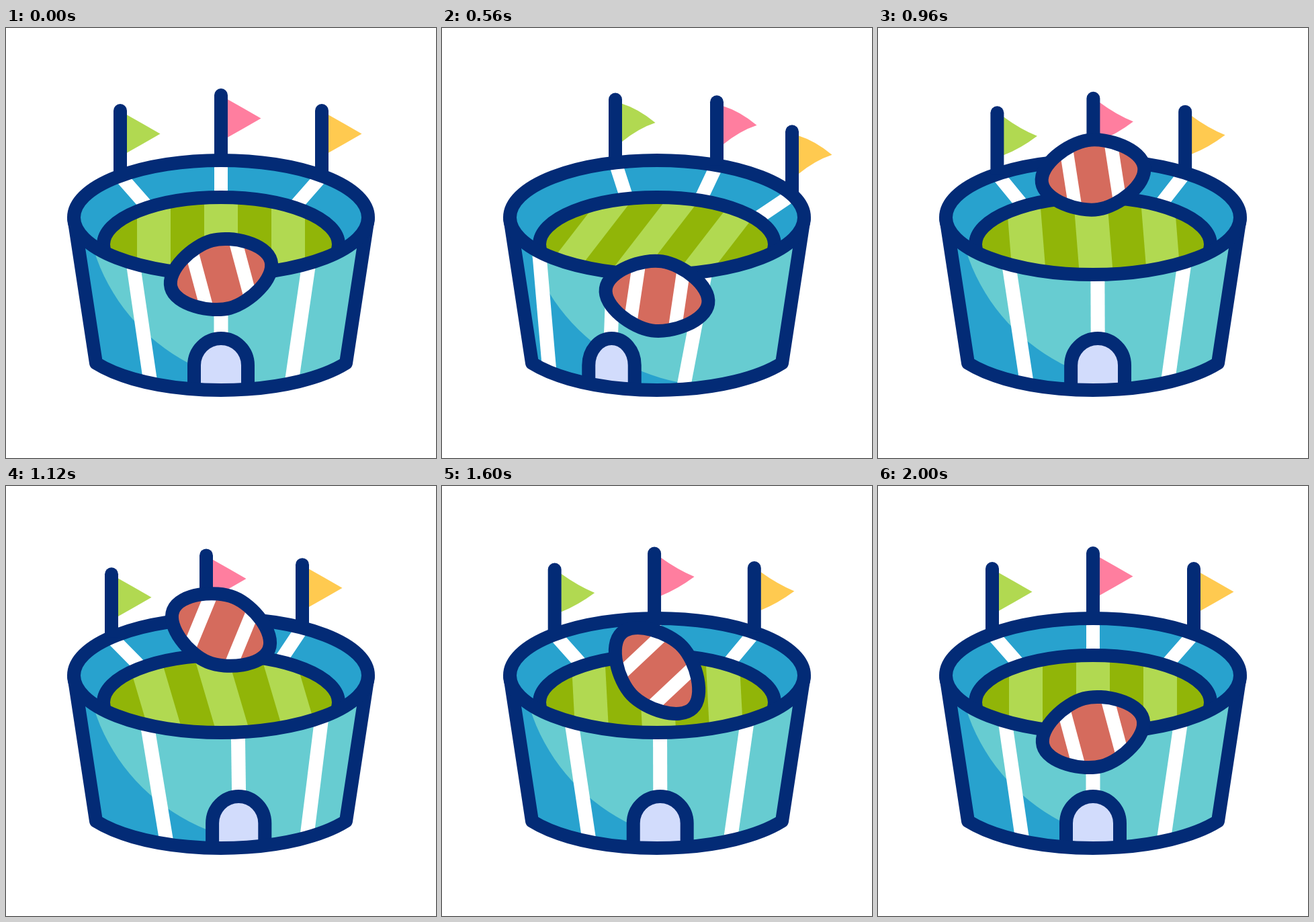
An HTML page with a canvas for the animation above (2.32 s loop, 640 px wide and 640 px high).

```html
<!DOCTYPE html>
<html lang="en">
<head>
<meta charset="utf-8">
<title>Stadium</title>
<style>
html, body { margin: 0; width: 100%; height: 100%; overflow: hidden; background: #fff; }
canvas { display: block; width: 640px; height: 640px; }
</style>
</head>
<body>
<canvas id="stage"></canvas>
<script>
const LOOP = 2320, STEP = 40, LAST = 50;
const NAVY = '#032b76', BLUE = '#28a2ce', TEAL = '#67ccd1', WHITE = '#fff';
const GRASS = '#91b508', LIGHT = '#b1d951', DOOR = '#d2dcfc', LEATHER = '#d56b5d';

const canvas = document.getElementById('stage');
const ratio = window.devicePixelRatio || 1;
canvas.width = canvas.height = 640 * ratio;
const ctx = canvas.getContext('2d');

const MID = 320;
const RIM = { x: MID, y: 282, rx: 219, ry: 85 };
const BASE = { ...RIM, y: 454 };
const FIELD = { x: MID, y: 322, rx: 175, ry: 70 };
const SHADE = { x: 410, y: 247, rx: 292, ry: 286 };

// Pole places at rest, turned right and turned left
const POLES = [
  { x: [170, 258, 157], color: LIGHT },
  { x: [320, 409, 298], color: '#ff7e9f' },
  { x: [470, 521, 441], color: '#ffca50' }
];
const TURN = [0, -18.3, 7];

// Keys: step, value, then bias and power of the ease that leads there
const BALL_Y = [[0, 366.5], [10, 419], [28, 214, 0.72, 2.4], [50, 366.5, 1.47, 2]];
const BALL_TURN = [[0, -15], [9, -41, 1, 2], [34, 218, 0.6, 1.65], [50, 345, 1.7, 2.5]];
const WAVE = [[0, 0], [11, -11], [20, 9], [28, 0], [40, 4], [50, 0]];

// S-shaped ease; a bias under 1 speeds up the first half
function ease(s, bias = 1, power = 1.7) {
  if (s <= 0) return 0;
  return 1 / (1 + (bias * (1 - s) / s) ** power);
}

function tween(keys, n) {
  const i = Math.max(1, keys.findIndex(key => key[0] >= n));
  const [t0, v0] = keys[i - 1], [t1, v1, bias, power] = keys[i];
  return v0 + (v1 - v0) * ease((n - t0) / (t1 - t0), bias, power);
}

// Shares of the three poses: rest, turned right, turned left
function poseWeights(n) {
  if (n <= 14) {
    const p = Math.sin(n / 14 * Math.PI / 2);
    return [1 - p, p, 0];
  }
  if (n <= 28) {
    const p = ease((n - 14) / 14, 1, 1.5);
    return [0, 1 - p, p];
  }
  const p = ease((n - 28) / 22, 0.56, 2);
  return [p, 0, 1 - p];
}

function ellipse(e) {
  ctx.beginPath();
  ctx.ellipse(e.x, e.y, e.rx, e.ry, 0, 0, 2 * Math.PI);
}

function fill(color) {
  ctx.fillStyle = color;
  ctx.fill();
}

function stroke(color = NAVY) {
  ctx.strokeStyle = color;
  ctx.lineWidth = 20;
  ctx.stroke();
}

// Upright or slanted band between two heights
function band(x0, y0, x1, y1, width, color) {
  ctx.beginPath();
  ctx.moveTo(x0, y0);
  ctx.lineTo(x0 + width, y0);
  ctx.lineTo(x1 + width, y1);
  ctx.lineTo(x1, y1);
  fill(color);
}

// Height of an ellipse at x: side -1 is the far half, 1 the near half
function edgeY(e, x, side) {
  const u = (x - e.x) / e.rx;
  return e.y + side * e.ry * Math.sqrt(Math.max(0, 1 - u * u));
}

function clipped(draw) {
  ctx.save();
  ctx.clip();
  draw();
  ctx.restore();
}

function wallPath() {
  const a = Math.acos(186 / BASE.rx);
  ctx.beginPath();
  ctx.moveTo(MID - RIM.rx, RIM.y);
  ctx.ellipse(MID, BASE.y, BASE.rx, BASE.ry, 0, Math.PI - a, a, true);
  ctx.lineTo(MID + RIM.rx, RIM.y);
}

function drawDoor(turn) {
  const x = MID + 215 * Math.sin(turn), half = 40 * Math.cos(turn) ** 3, y = 502;
  ctx.beginPath();
  ctx.moveTo(x - half, edgeY(BASE, x - half, 1));
  ctx.lineTo(x - half, y);
  ctx.ellipse(x, y, half, 40, 0, Math.PI, 2 * Math.PI);
  ctx.lineTo(x + half, edgeY(BASE, x + half, 1));
  fill(DOOR);
  stroke();
}

function drawWall(turn) {
  wallPath();
  fill(BLUE);
  clipped(() => {
    ellipse(SHADE);
    fill(TEAL);
    const R = 205, skew = 0.33 * R * Math.sin(turn);
    for (let side = -1; side <= 1; side++) {
      const top = R * Math.sin(side * 0.702 + turn), low = 0.78 * top + skew;
      band(MID + top - 10.5, 340, MID + low - 10.5, 540, 21, WHITE);
    }
  });
  drawDoor(turn);
  wallPath();
  stroke();
}

function drawBackStripe(x) {
  const low = MID + 0.77 * (x - MID);
  ctx.beginPath();
  ctx.moveTo(x, edgeY(RIM, x, -1));
  ctx.lineTo(low, edgeY(FIELD, low, -1) - 10);
  ctx.lineTo(low + (low - x) * 0.3, edgeY(FIELD, low, -1) + 2);
  stroke(WHITE);
}

function drawField(turn) {
  const deg = turn * 180 / Math.PI;
  const shift = y => deg * (-1.7 + 3.8 * (y - 265) / 90);
  ellipse(FIELD);
  fill(GRASS);
  clipped(() => {
    for (let x = 195; x < 400; x += 100) {
      band(x + shift(240), 240, x + shift(400), 400, 50, LIGHT);
    }
  });
  ellipse(FIELD);
  stroke();
}

function drawBowl(turn, mix) {
  ellipse(RIM);
  fill(BLUE);
  clipped(() => {
    POLES.forEach(pole => drawBackStripe(mix(pole.x)));
    drawField(turn);
  });
  ellipse(RIM);
  stroke();
}

function drawFlag(x, y, bend, color) {
  ctx.beginPath();
  ctx.moveTo(x, y + 6);
  ctx.quadraticCurveTo(x + 25, y + 20 + bend, x + 50, y + 34.5);
  ctx.quadraticCurveTo(x + 25, y + 49 + bend, x, y + 63);
  fill(color);
}

function drawPole(pole, mix, drop, bend) {
  const x = mix(pole.x);
  const y = mix(pole.x.map(px => edgeY(RIM, px, -1))) - 97 + drop;
  drawFlag(x + 9.5, y, bend, pole.color);
  const base = edgeY(RIM, x, -1);
  ctx.beginPath();
  ctx.arc(x, y, 10, Math.PI, 2 * Math.PI);
  ctx.lineTo(x + 10, base);
  ctx.lineTo(x - 10, base);
  fill(NAVY);
}

function ballPath() {
  const a = 77, h = 52, u = 27, v = 30;
  ctx.beginPath();
  ctx.moveTo(-a, 0);
  ctx.bezierCurveTo(-a, -u, -v, -h, 0, -h);
  ctx.bezierCurveTo(v, -h, a, -u, a, 0);
  ctx.bezierCurveTo(a, u, v, h, 0, h);
  ctx.bezierCurveTo(-v, h, -a, u, -a, 0);
  ctx.closePath();
}

function drawBall(n) {
  ctx.save();
  ctx.translate(MID, tween(BALL_Y, n));
  ctx.rotate(tween(BALL_TURN, n) * Math.PI / 180);
  ballPath();
  fill(LEATHER);
  clipped(() => {
    for (const x of [-33.5, 33.5]) band(x - 10, -60, x - 10, 60, 20, WHITE);
  });
  ballPath();
  stroke();
  ctx.restore();
}

function render(ms) {
  const n = Math.min(LAST, Math.floor(ms % LOOP / STEP));
  const w = poseWeights(n);
  const mix = v => v[0] * w[0] + v[1] * w[1] + v[2] * w[2];
  const turn = mix(TURN) * Math.PI / 180;
  const bend = tween(WAVE, n);
  ctx.setTransform(ratio, 0, 0, ratio, 0, 0);
  ctx.lineJoin = 'round';
  ctx.fillStyle = WHITE;
  ctx.fillRect(0, 0, 640, 640);
  drawWall(turn);
  drawBowl(turn, mix);
  POLES.forEach(pole => drawPole(pole, mix, 3 * (1 - w[0]), bend));
  drawBall(n);
}

const start = performance.now();
function tick() {
  render(performance.now() - start);
  requestAnimationFrame(tick);
}
tick();
</script>
</body>
</html>
```
